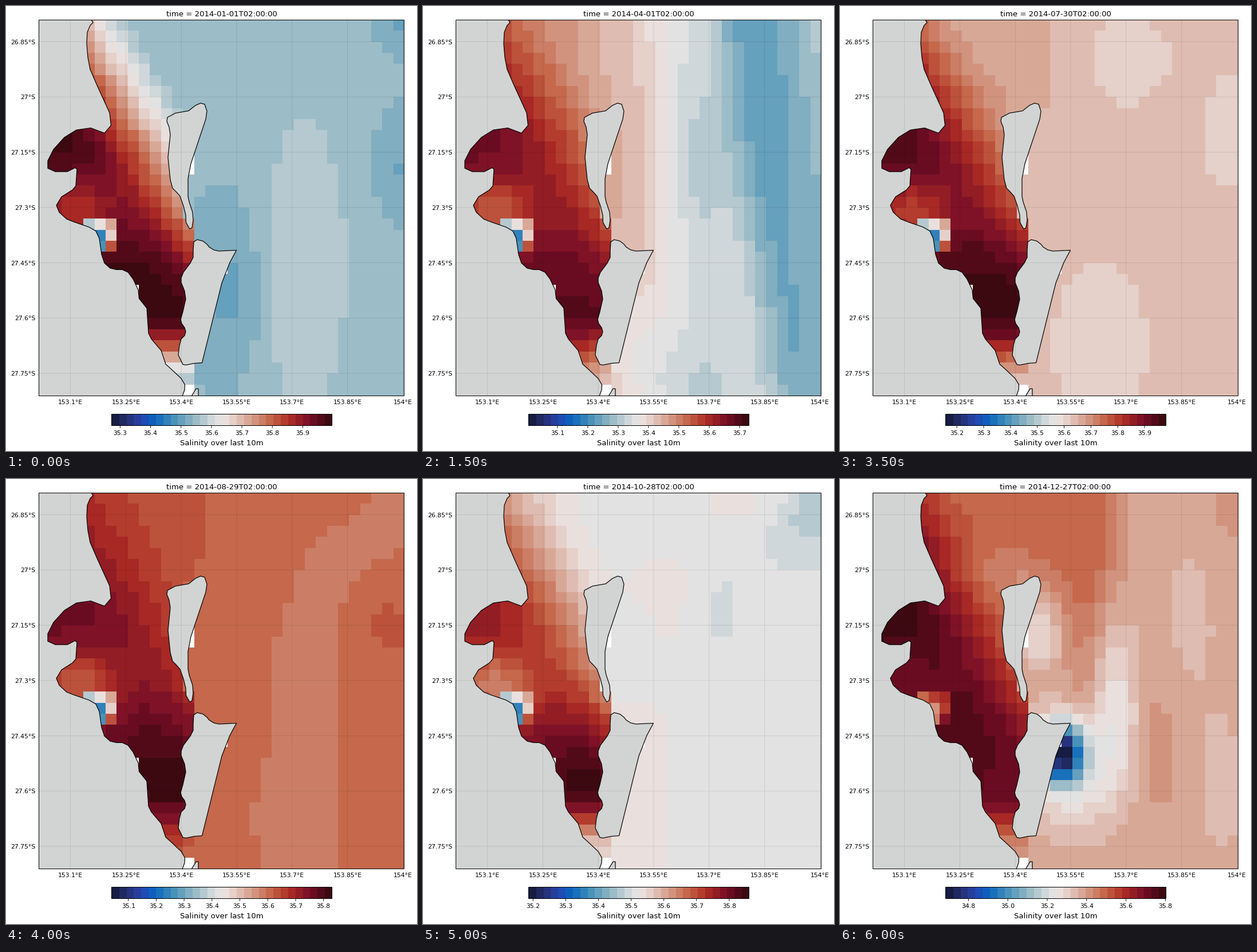
These frames come from a looping animation (718 px wide and 779 px high, 6.5 s). A matplotlib script:

```python
import math

import numpy as np
import matplotlib.pyplot as plt
from matplotlib.animation import FuncAnimation
from matplotlib.colors import LinearSegmentedColormap
from matplotlib.patches import Polygon, Rectangle

W, H = 718, 779
LEFT, RIGHT, TOP, BOTTOM = 57.5, 695.5, 24.5, 682.5
BAR_L, BAR_R, BAR_T, BAR_B = 184.5, 569.5, 714.5, 734.5
COLS, ROWS, LEVELS = 33, 34, 30
LAND = "#d2d4d3"
SMALL, BIG = 10.9, 13.2

plt.rcParams["font.family"] = "DejaVu Sans"
plt.rcParams["path.snap"] = False

SHADES = [(0, "#171c42"), (0.05, "#252f6e"), (0.09, "#293a8f"),
          (0.12, "#2644ac"), (0.155, "#1555bd"), (0.185, "#0b66bd"),
          (0.27, "#4590b9"), (0.36, "#8eb5c2"), (0.45, "#d2d8db"),
          (0.5, "#ece8e7"), (0.55, "#e6d2cc"), (0.64, "#d59d89"),
          (0.73, "#c46548"), (0.82, "#ac2b24"), (0.91, "#780e28"),
          (1, "#3c0911")]
cmap = LinearSegmentedColormap.from_list("salt", SHADES).resampled(LEVELS)
cmap.set_bad((1, 1, 1, 0))

x, y = np.meshgrid(np.arange(COLS), np.arange(ROWS))


def ramp(v, a, b):
    """Smooth step from 0 at a to 1 at b."""
    t = np.clip((v - a) / (b - a), 0, 1)
    return t * t * (3 - 2 * t)


def blob(cx, cy, rx, ry):
    return np.exp(-((x - cx) / rx) ** 2 - ((y - cy) / ry) ** 2)


# The bay lies west of the islands and grows saltier towards its head.
inside = (x < 13) | ((x < 14) & (y > 17))
west = inside * (1 - ramp(x - np.where(y < 11, 0.6, 0.5) * (y - 11), 2, 16))
south = inside * blob(11, 26, 5, 5.5)
tail = ramp(y, 26, 33)
dilution = 18 * inside * blob(3, 17, 4, 3.5)

# Fresh cells at the river mouth, and dry cells next to the coast.
RIVER = {(18, 4): 42, (18, 5): 53, (18, 6): 62, (19, 5): 25,
         (19, 6): 56, (20, 5): 29, (20, 6): 76}
DRY = [(12, 13), (13, 13), (22, 16), (24, 8), (33, 13)]


def month(low, high, sea, head, deep, flow=1.0):
    """Scale limits and the field in percent of that scale."""
    field = sea + (head - sea) * west
    field += (deep - field) * south
    field += (sea - field) * tail * inside - flow * dilution
    for cell, fresh in RIVER.items():
        field[cell] += flow * (fresh - field[cell])
    return low, high, np.clip(field, 0, 100)


def january():
    sea = 37 + 6 * blob(23.5, 22, 4.5, 16) - 5 * blob(17, 24, 3, 7)
    sea -= 4 * blob(32.5, 13, 2.5, 4) + 4 * blob(32.5, 0, 2, 2)
    return month(35.272, 35.996, sea, 98, 98)


def march():
    front = x - 0.15 * y
    sea = 44 - 18 * ramp(x, 14, 22) + 8 * (1 - ramp(x, 8, 15))
    sea += 8 * ramp(front, 28, 33) - 22 * ramp(front, 21, 26)
    sea -= 7 * blob(22, 12, 4, 7) + 8 * blob(18, 33, 5, 5)
    sea -= 10 * blob(15, 28, 3, 6)
    return month(35.259, 35.888, sea, 97, 99)


def may():
    sea = 92 - 6 * ramp(x, 15, 23) + (14 - 0.2 * y) * ramp(x, 25.5, 33)
    sea -= 8 * blob(16, 0, 5, 6) + 4 * blob(25, 33, 3, 5)
    return month(34.497, 35.417, sea, 82, 83)


def july():
    sea = 57.5 + 5 * blob(12, 2, 5, 9) - 2.5 * blob(22, 3, 4, 4)
    sea += 2.5 * ramp(x, 24, 29) * ramp(y, 13, 19)
    sea -= 3.5 * blob(33, 10, 3, 5) + 2.5 * blob(20, 29, 4, 7)
    return month(35.158, 35.980, sea, 96, 99)


def september():
    crest = 24 + 9 * np.maximum(0, 1 - y / 14) ** 2
    sea = 85.5 - 6 * np.exp(-((x - crest) / 3.5) ** 2)
    sea += 7 * (1 - ramp(x, 7, 14)) + 7 * blob(32, 11, 4, 5)
    sea -= 3 * blob(33, 2, 4, 4) + 2 * blob(15, 14, 5, 4)
    return month(34.922, 35.681, sea, 88, 99)


def november():
    sea = 15 - (9 - 0.1 * y) * ramp(x, 26, 32) + 3 * blob(24, 0, 2, 2)
    sea -= 4.5 * blob(14, 1, 7, 4) + 4 * blob(22.5, 7, 2.5, 6)
    sea += 2.5 * blob(19, 9, 2, 4) + 4 * blob(14, 33, 2, 2)
    sea -= 2.5 * blob(14, 13, 2, 3)
    return month(35.451, 36.040, sea, 84, 97)


def december():
    sea = 62 + 9 * (1 - ramp(x, 19, 24)) * (1 - ramp(y, 4, 14))
    sea += 6 * blob(18.5, 12, 1.8, 7) - 9 * blob(14.5, 12, 2, 3)
    sea -= 11 * blob(21.5, 19, 2, 7) + 6 * blob(9, 7, 4, 2.5)
    sea -= 55 * blob(16.5, 23, 2, 2.6) + 12 * blob(17.5, 25, 4, 5)
    sea += 3 * blob(25, 22, 2.5, 8) + 3 * blob(32, 0, 2, 4)
    sea -= 3 * blob(28, 11, 3, 8) + 3 * blob(31, 26, 3, 8)
    return month(34.684, 35.803, sea, 98, 93, flow=0.4)


KNOWN = {0: january(), 2: march(), 5: may(), 7: july(), 9: september(),
         11: november(), 12: december()}
STEPS = 13


def state(k):
    """Scale limits and field at step k, blended between known months."""
    before = max(s for s in KNOWN if s <= k)
    after = min(s for s in KNOWN if s >= k)
    t = (k - before) / max(after - before, 1)
    return [a + t * (b - a) for a, b in zip(KNOWN[before], KNOWN[after])]


MAINLAND = [
    (57, 24), (149, 24), (152, 29), (147, 34), (142, 46), (141, 66), (143, 90),
    (147, 111), (160, 141), (181, 187), (183.5, 209), (172, 222.5),
    (148, 213.5), (123, 217), (102, 230), (83, 251), (73, 271), (73, 284),
    (86, 290), (107, 290), (121, 283), (124, 286), (122, 315), (116, 322),
    (97, 334), (88, 349), (93, 361), (106, 373), (120, 378.5), (145, 387),
    (157, 394), (163, 407), (167, 435), (172, 450), (182, 459), (193, 461.5),
    (203, 461.5), (213, 466), (222, 478), (231, 497), (232.5, 512), (246, 529),
    (249, 573), (254, 583), (271, 603), (279, 627), (289, 636), (306, 652),
    (312.5, 663), (312, 672), (308, 683), (57, 683)]
NORTH_ISLAND = [
    (281, 202), (282, 195), (296, 187.5), (319, 183.5), (331, 174), (340, 170),
    (347, 172), (351, 184), (349, 198), (323, 276), (318, 302), (318, 333),
    (320, 343), (326, 361), (327, 375), (325, 388), (321, 390.5), (314.5, 379),
    (314, 366), (310, 350), (304, 333), (298, 326), (291, 319), (287, 304),
    (283, 265), (287, 225), (285, 212)]
SOUTH_ISLAND = [
    (328, 413), (334, 409), (344, 411.5), (351, 417), (355, 422), (363, 427),
    (372, 429), (402.5, 427.5), (391, 449), (377, 485), (342.5, 624.5),
    (329, 625.5), (314, 628.5), (309, 627.5), (301, 611), (303, 594),
    (306, 583), (312, 577), (314, 570), (312, 563), (307, 556), (305, 549),
    (309, 535), (314, 513), (312, 499), (306, 484), (306, 476), (310, 466),
    (322, 450), (327, 440), (327, 428)]
ISLET = [(324, 683), (332, 670), (336, 670), (336, 683)]

# At 72 dpi one point is one pixel.
fig = plt.figure(figsize=(W / 72, H / 72), dpi=72, facecolor="white")
ax = fig.add_axes([0, 0, 1, 1])
ax.axis("off")


def label(px, py, text, size=SMALL, align="center"):
    return ax.text(px, py, text, fontsize=size, ha=align, va="baseline")


def raster(data, left, right, top, bottom, peak):
    return ax.imshow(data, cmap=cmap, vmin=0, vmax=peak, aspect="auto",
                     interpolation="nearest", extent=(left, right, bottom, top))


def outline(left, right, top, bottom):
    box = Rectangle((left, top), right - left, bottom - top,
                    fill=False, ec="black", lw=1, zorder=5)
    return ax.add_patch(box)


sea_map = raster(np.zeros((ROWS, COLS)), LEFT, RIGHT, TOP, BOTTOM, 100)
raster(np.arange(LEVELS)[None], BAR_L, BAR_R, BAR_T, BAR_B, LEVELS - 1)
frame = outline(LEFT, RIGHT, TOP, BOTTOM)
outline(BAR_L, BAR_R, BAR_T, BAR_B)

for shape in (MAINLAND, NORTH_ISLAND, SOUTH_ISLAND, ISLET):
    land = ax.add_patch(Polygon(shape, fc=LAND, ec="black", lw=1.2, zorder=2))
    land.set_clip_path(frame)

for i in range(7):
    px, py = 112.5 + 96.83 * i, 62.5 + 96.75 * i
    ax.plot([px, px], [TOP, BOTTOM], color="black", alpha=0.1, lw=0.9, zorder=3)
    ax.plot([LEFT, RIGHT], [py, py], color="black", alpha=0.1, lw=0.9, zorder=3)
    label(px, 697, f"{153.1 + 0.15 * i:.5g}°E")
    label(51.5, py + 4, f"{26.85 + 0.15 * i:.5g}°S", align="right")

title = label(376.5, 18, "", BIG)
label(376.5, 769, "Salinity over last 10m", BIG)
ticks = [(ax.plot([0, 0], [BAR_B, BAR_B + 4], color="black", lw=0.9)[0],
          label(0, 751, "")) for _ in range(10)]

ax.set_xlim(0, W)
ax.set_ylim(H, 0)


def update(k):
    low, high, field = state(k)
    field = field.copy()
    for cell in DRY:
        field[cell] = np.nan
    sea_map.set_data(np.ma.masked_invalid(field))

    date = np.datetime64("2014-01-01T02:00:00") + np.timedelta64(30 * k, "D")
    title.set_text(f"time = {date}")

    step = 0.1 if high - low < 0.9 else 0.2
    first, last = math.ceil(low / step), math.floor(high / step)
    for i, (mark, text) in enumerate(ticks):
        value = (first + i) * step
        shown = first + i <= last
        px = BAR_L + (value - low) / (high - low) * (BAR_R - BAR_L)
        mark.set_visible(shown)
        text.set_visible(shown)
        mark.set_xdata([px, px])
        text.set_x(px)
        text.set_text(f"{value:.1f}")
    return []


anim = FuncAnimation(fig, update, frames=STEPS, interval=500, repeat=True,
                     repeat_delay=0, init_func=lambda: update(0))
plt.show()
```
